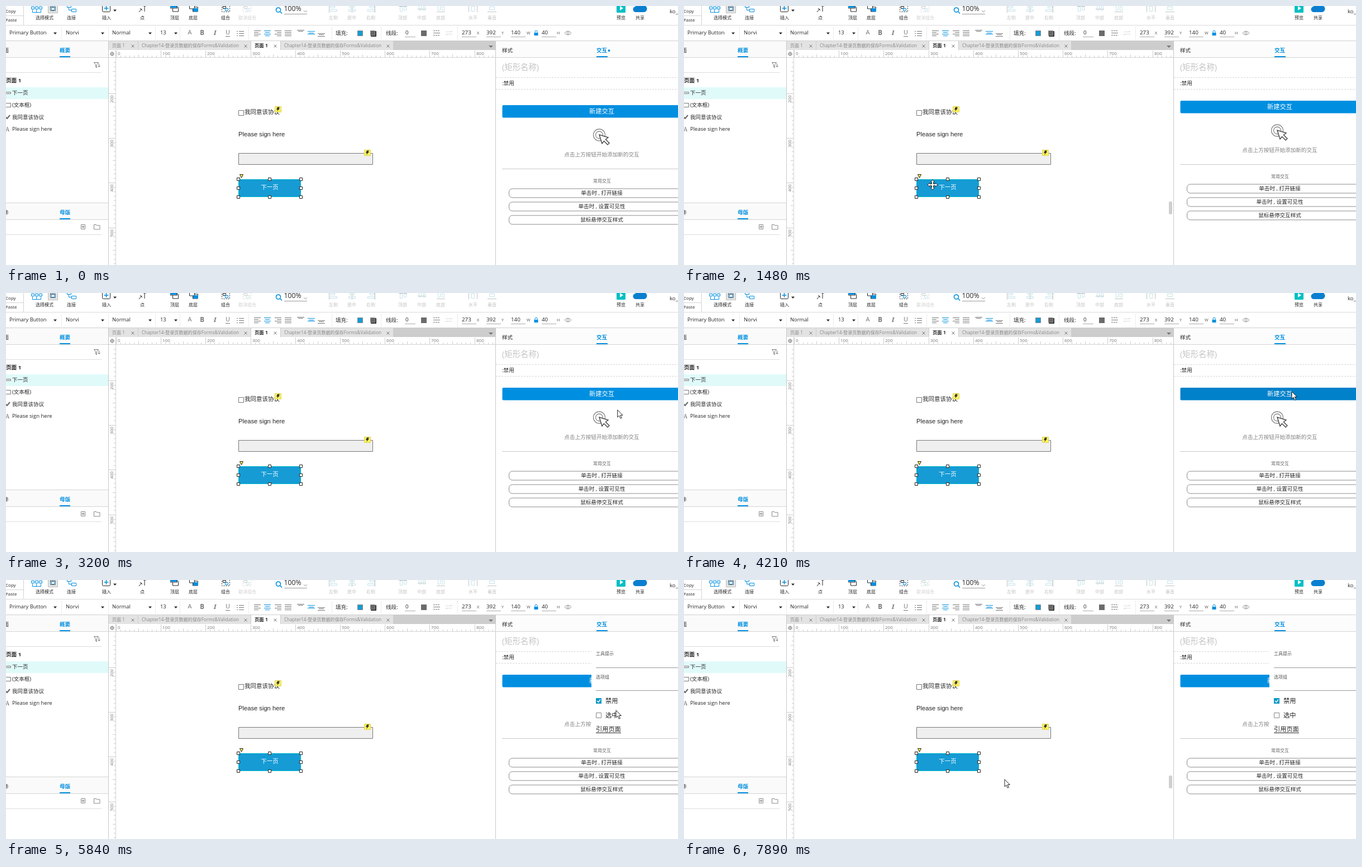
These frames come from a looping animation (1203x465 px, 8000 ms). An HTML page with a canvas:

```html
<!DOCTYPE html>
<html lang="zh">
<meta charset="utf-8">
<style>
html, body { margin: 0; width: 100%; height: 100%; overflow: hidden; background: #fff }
canvas { display: block }
</style>
<canvas id="stage" width="1203" height="465"></canvas>
<script>
const g = document.getElementById('stage').getContext('2d');
const LOOP = 8000, BLUE = '#008fe0', BTN = '#169bd5', INK = '#262626', PALE = '#cfcfcf';
const UI = '"Open Sans","Noto Sans CJK SC",sans-serif';
const ARIAL = '"Liberation Sans","Noto Sans CJK SC",sans-serif';

// Cursor stops: time, x, y
const stops = [
  [440, 1203, 428], [930, 518, 367], [1250, 518, 367], [1480, 445, 321], [1630, 445, 321],
  [2060, 1000, 122], [2420, 1097, 372], [2480, 1097, 372], [2560, 1129, 427], [2700, 1129, 427],
  [3340, 1090, 180], [4150, 1090, 180], [4210, 1088, 177], [4590, 1187, 140], [5280, 1187, 140],
  [5690, 1098, 236], [5790, 1098, 236], [5840, 1092, 234], [6010, 1074, 224], [6290, 1074, 224],
  [6710, 1061, 212], [6840, 1061, 212], [6940, 1068, 203], [7150, 1068, 203], [7270, 1074, 189],
  [7890, 574, 358], [8000, 574, 358]
];

function cursorAt(t) {
  const i = stops.findIndex(s => s[0] > t);
  if (i < 1) return null;
  const [t0, x0, y0] = stops[i - 1], [t1, x1, y1] = stops[i];
  const u = (t - t0) / (t1 - t0), e = u * u * (3 - 2 * u);
  return { x: x0 + (x1 - x0) * e, y: y0 + (y1 - y0) * e };
}

function text(s, x, y, size = 9.6, color = INK, align = 'left', style = '', family = UI) {
  g.font = `${style} ${size}px ${family}`;
  g.fillStyle = color;
  g.textAlign = align;
  g.textBaseline = 'middle';
  g.fillText(s, x, y + .7);
}
function rect(x, y, w, h, color) { g.fillStyle = color; g.fillRect(x, y, w, h); }
function frame(x, y, w, h, color, fill, r = 0) {
  g.beginPath();
  g.roundRect(x + .5, y + .5, w, h, r);
  if (fill) { g.fillStyle = fill; g.fill(); }
  g.lineWidth = 1; g.strokeStyle = color; g.stroke();
}
function round(x, y, w, h, r, color) {
  g.beginPath(); g.roundRect(x, y, w, h, r);
  g.fillStyle = color; g.fill();
}
const hline = (x0, x1, y, color = '#d4d4d4') => rect(x0, y, x1 - x0, 1, color);
const vline = (x, y0, y1, color = '#d4d4d4') => rect(x, y0, 1, y1 - y0, color);
function path(d, x, y, stroke, fill, width = 1) {
  const p = new Path2D(d);
  g.save();
  g.translate(x, y);
  if (fill) { g.fillStyle = fill; g.fill(p); }
  if (stroke) { g.strokeStyle = stroke; g.lineWidth = width; g.stroke(p); }
  g.restore();
}
const drop = (x, y, color = INK) => path('M-3-1.5H3L0 2Z', x, y, null, color);
const ARROW = 'M0 0V13L3 10.3 5.3 15.3 7.5 14.3 5.2 9.5H9.3Z';

function toolbar(sel) {
  const on = sel ? INK : PALE, accent = sel ? BLUE : '#b9def0', grey = '#c3c3c3', mint = '#c6e2ea';
  text('Copy', -1, 9, 8); text('Paste', -1, 25.5, 8);
  hline(0, 31, 17); vline(31, 0, 34);

  for (const x of [45, 52, 59]) frame(x, 1, 5, 4, BLUE);
  path('M2 0V5H17V0M9 0V5', 45.5, 6.5, BLUE);
  frame(75, -3, 17, 15, '#bbb', '#e6e6e6');
  g.setLineDash([2, 1]); frame(79, 1, 9, 7, INK); g.setLineDash([]);
  frame(81, 2, 5, 5, BLUE, '#fff');
  path('M0-2H7V3H0ZM8 6H16V11H8ZM3 3V8H8', 109.5, -.5, BLUE);
  frame(172, -5, 14, 15, INK, '#fff', 2);
  path('M0 4H8M4 0V8', 175.5, 0, BLUE, null, 1.5);
  drop(195, 8);
  path('M0 11L5 5M2 4L6 8M10 0V10M8 0H13', 238, 0, on);
  path('M0-2H12V4H0ZM4 4V10H14V2', 294.5, 0, on); rect(294, -1, 12, 4, accent);
  path('M0-2H9V5H0ZM6 5V10H15V2H9', 328.5, 0, on); rect(335, 4, 9, 6, accent);
  for (const [x, c] of [[386, on], [424, PALE]]) {
    g.setLineDash([2, 2]); frame(x, -3, 14, 13, c); g.setLineDash([]);
    frame(x + 2, 0, 5, 4, c); frame(x + 6, 4, 5, 4, c === on ? accent : mint);
  }
  [578, 612, 646].forEach((x, i) => {
    vline(x + i * 7, -2, 12, grey);
    frame(x + [2, 3, 5][i], 0, 8, 3, mint); frame(x + [2, 1, 1][i], 6, 12, 3, mint);
  });
  [703, 737, 771].forEach((x, i) => {
    hline(x, x + 15, i * 5, grey);
    frame(x + 2, i ? -1 : 1, 4, 8, mint); frame(x + 9, 1, 4, 6, mint);
  });
  vline(828, -1, 11, grey); vline(843, -1, 11, grey); frame(833, 0, 5, 9, mint);
  hline(862, 878, 10, grey); frame(865, 1, 9, 5, mint);

  [['选择模式', 69, INK], ['连接', 117, INK], ['插入', 180, INK], ['点', 244, on], ['顶层', 302, on],
   ['底层', 335, on], ['组合', 393, on], ['取消组合', 432, PALE], ['左侧', 586, grey], ['居中', 619, grey],
   ['右侧', 653, grey], ['顶部', 710, grey], ['中部', 744, grey], ['底部', 778, grey], ['水平', 836, grey],
   ['垂直', 870, grey], ['预览', 1101, INK], ['共享', 1135, INK]
  ].forEach(([s, x, c]) => text(s, x, 21.7, 8, c, 'center'));

  path('M8 4A4 4 0 1 0 0 4A4 4 0 1 0 8 4M7 7L10.5 10.5', 483.5, 3, BLUE, null, 1.6);
  text('100%', 497.5, 5.5, 12.2); hline(498, 539, 14, '#999');
  path('M0 0L3 3 6 0', 533, 8, '#999');
  round(1093, -4, 16, 16, 1, '#00bfc4');
  path('M0 0L6 4 0 8Z', 1099, 0, null, '#fff');
  path('M5 11A5 5 0 0 1 4 1A8 8 0 0 1 18-1A6 6 0 0 1 19 11Z', 1123, 0, null, '#0a7fd0');
  text('ko_', 1188, 9.5, 9.6);
  hline(0, 1203, 34, '#dadada');
}

function formatBar(sel) {
  const on = sel ? INK : '#c4c4c4', icon = sel ? '#777' : '#c9c9c9', accent = sel ? BLUE : icon, y = 48;
  [[sel ? 'Primary Button' : 'Default', 6, 88], ['Norvi', 107, 173], ['Normal', 190, 258], ['13', 276, 304]]
    .forEach(([s, x, a]) => { text(s, x, y, 9.4, on); drop(a, 49, on); });
  [99, 183, 267, 311, 434, 583, 671, 808].forEach(x => vline(x, 37, 61, '#ebebeb'));
  text('A', 329, 47, 11, icon, 'center');
  text('B', 351, y, 11.5, icon, 'center', 'bold');
  text('I', 374, y, 11.5, icon, 'center', 'italic 600', '"Noto Serif",serif');
  text('U', 397, 47.5, 11, icon, 'center'); hline(393, 401, 54, icon);
  for (const d of [0, 4, 8]) { rect(413, 45 + d, 2, 1, icon); hline(417, 426, 45 + d, icon); }
  [444, 462, 481, 499].forEach((x, i) => {
    for (let k = 0; k < 4; k++) {
      const cut = k % 2 && i < 3 ? 4 : 0;
      hline(x + cut * i / 2, x + 12 - cut * (1 - i / 2), 44 + k * 3, i === 1 ? accent : icon);
    }
  });
  [521, 540, 558].forEach((x, i) => {
    const top = [43, 45, 49][i], c = i === 1 ? accent : icon;
    hline(x, x + 13, top, c); hline(x + 2, x + 11, top + 2 + (i === 1), c); if (i) hline(x, x + 13, top + 5, c);
  });

  text('填充:', 590, 48.5); text('线段:', 680, 48.5);
  frame(629, 44, 9, 9, sel ? '#888' : '#ccc', sel ? BTN : '#fff');
  frame(653, 45, 9, 9, sel ? INK : '#ccc', sel ? '#444' : '#fff');
  frame(652, 44, 8, 8, sel ? '#888' : '#ccc', sel ? '#666' : '#e4e4e4');
  text(sel ? '0' : '1', 715, y, 9.8, on); hline(714, 733, 55, '#aaa');
  rect(743, 44, 10, 10, sel ? '#6b6b6b' : '#c4c4c4');
  g.setLineDash([3, 1]); path('M0 0H12M0 8H12', 765, 44.5, icon); g.setLineDash([]);
  hline(765, 777, 48, icon);
  path('M0 2H12L9 0M12 6H0L3 8', 787, 44.5, '#ddd');
  [['273', 816, 'X', 843], ['392', 860, 'Y', 887], ['140', 904, 'W', 932], ['40', 959, 'H', 986]]
    .forEach(([s, x, name, nx]) => {
      if (sel) text(s, x, y, 9.8);
      text(name, nx, 48.5, 7.2, '#555'); hline(x, x + 26, 55, '#aaa');
    });
  path('M-2 0V-2A2 2 0 0 1 2-2V0', 949, 48, BLUE); rect(945.5, 48, 7, 5, BLUE);
  path('M0 0Q6-7 12 0Q6 7 0 0ZM8 0A2 2 0 1 0 4 0A2 2 0 1 0 8 0', 1000, 48.5, sel ? '#999' : '#d4d4d4');
  hline(0, 1203, 62, '#d0d0d0');
}

function header(label, other, y) {
  rect(0, y, 183, 30, '#fafafa');
  hline(0, 183, y + 29);
  text(other, 5, y + 17, 9.6, INK, 'right');
  text(label, 105.5, y + 17, 9.6, BLUE, 'center', 'bold');
  rect(96, y + 27, 19, 2, BLUE);
}

function outline(sel) {
  header('概要', '面', 63);
  path('M0 0H8L5 4V9L3 8V4ZM9 2V8M7.5 6L9 8 11 6', 157.5, 101.5, '#777');
  hline(0, 171, 119, '#ddd');
  text('页面 1', 0, 134, 9.6, INK, 'left', 'bold');
  if (sel) rect(0, 146, 183, 21, '#e0fafa');
  frame(-3, 154, 11, 3, '#888', '#ddd');
  frame(-3, 174, 11, 7, '#777');
  path('M0 3L3 6 8 0', -1, 196, '#666', null, 2);
  text('A', -1, 221, 10, '#777', 'left', '', '"Noto Serif",serif');
  ['下一页', '(文本框)', '我同意该协议', 'Please sign here'].forEach((s, i) => text(s, 11, 156 + i * 21.7, 9.5));
  hline(0, 183, 353);
  header('母版', '件', 354);
  frame(134, 392, 7, 8, '#888'); path('M0 2.5H5M2.5 0V5', 135.5, 394, '#777');
  path('M0 0H4L5 1.5H10.5V8.5H0Z', 157.5, 392.5, '#888');
  hline(0, 171, 410, '#ddd');
}

function canvasFrame() {
  rect(184, 63, 692, 16, '#cdcdcd');
  const doc = 'Chapter14-登录页数据的保存Forms&Validation';
  [['页面 1', 184, 52], [doc, 237, 201], ['页面 1', 439, 52], [doc, 492, 201]].forEach(([s, x, w], i) => {
    const active = i === 2;
    rect(x, 63, w, 16, active ? '#fff' : '#e3e3e3');
    text(s, x + 6, 71, active ? 8.4 : 8.1, active ? INK : '#888', 'left', active ? 'bold' : '');
    path('M0 0L5 5M5 0L0 5', x + w - 11.5, 69.5, '#777');
  });
  path('M-4-2H4L0 2Z', 868, 73, null, '#777');
  hline(184, 876, 92); vline(196, 79, 465);
  path('M0 4H8M4 0V8M7 4A3 3 0 1 0 1 4A3 3 0 1 0 7 4', 186, 82, '#888');
  for (let k = 0; k < 85; k++) {
    const x = Math.round(197 + k * 8.02), y = Math.round(-3.4 + k * 8.02), major = k % 10 === 0;
    const len = major ? 12 : k % 5 ? 3 : 5;
    vline(x, 92 - len, 92, '#ccc');
    if (y > 93 && y < 465) hline(196 - len, 196, y, '#ccc');
    if (!major) continue;
    text(k * 10, x + 3, 85.5, 8, '#777');
    if (k >= 20 && k <= 50) {
      g.save(); g.translate(189.5, y + 10); g.rotate(-Math.PI / 2);
      text(k * 10, 0, 0, 8, '#777', 'center'); g.restore();
    }
  }
  vline(183, 63, 465, '#c8c8c8'); vline(876, 63, 465, '#c8c8c8');
}

function note(x, y) {
  frame(x, y, 11, 10, '#ddd45a', '#fff35c');
  path('M2 0H6L4.5 2.5H6L1 8 2.3 4.5H0Z', x + 3, y + 1.5, null, '#333');
}

function widgets(sel) {
  frame(416, 187, 9, 9, '#777', '#fff');
  text('我同意该协议', 427, 190.5, 10.5, INK, 'left', '', ARIAL);
  note(481, 180);
  text('Please sign here', 416, 230.3, 11.2, INK, 'left', '', ARIAL);
  frame(416, 264, 240, 20, '#777', '#efefef');
  note(641, 258);
  round(416, 311, 112, 32, 4, BTN);
  text('下一页', 472, 325.8, 10.5, '#fff', 'center', '', ARIAL);
  if (!sel) return;
  frame(416, 311, 111, 31, '#00b8c8');
  for (const x of [416, 472, 528]) for (const y of [311, 327, 343])
    if (x !== 472 || y !== 327) frame(x - 3, y - 3, 5, 5, '#222', '#fff');
  path('M0 0H6L3 6Z', 418.5, 302.5, '#222', '#ffee40');
}

function inspector(t, sel) {
  rect(877, 63, 326, 29, '#fcfcfc');
  hline(877, 1203, 92);
  text('样式', 888, 79.7);
  text('交互', 1057, 79.7, 9.6, BLUE, 'left', 'bold');
  rect(1057, 90, 20, 2, BLUE);
  if (t < 930) { g.beginPath(); g.arc(1079.5, 80, 2, 0, 7); g.fillStyle = BLUE; g.fill(); }

  const top = !sel ? 117 : t < 930 ? 178 : 170;
  if (sel) {
    text('(矩形名称)', 888, 110.5, 14.4, '#c4c4c4');
    if (t > 4380 && t < 4590) rect(877, 129, 326, 20, '#f7f7f7');
    g.setLineDash([3, 2]);
    path('M0 0H326M0 21H326', 877, 128.5, '#d6d6d6');
    g.setLineDash([]);
    text(':禁用', 888, 138.5);
  }
  const hot = t > 3260 && t < 4330;
  round(888.5, top, 330, 22.6, 2, hot ? '#0081ca' : BLUE);
  text('新建交互', 1066.5, top + 11, 11.2, '#fff', 'center');
  for (const r of [10.5, 6.5]) {
    g.beginPath(); g.arc(1062, top + 53.5, r, 0, 7);
    g.lineWidth = 1.3; g.strokeStyle = '#8a8a8a'; g.stroke();
  }
  path('M0 0L5 16 8.5 11.5 15 18 18 15 11.5 8.5 16 5Z', 1062, top + 53, '#444', '#fff', 1.4);
  text('点击上方按钮开始添加新的交互', 1066.5, top + 88.5, 9.6, '#808080', 'center');
  hline(888, 1203, top + 114, '#c8c8c8');
  if (sel) {
    text('常用交互', 1067, top + 136.2, 8, '#666', 'center');
    ['单击时 , 打开链接', '单击时 , 设置可见性', '鼠标悬停交互样式'].forEach((s, i) => {
      const y = top + 150 + i * 24, hover = i === 2 && t > 2370 && t < 2730;
      frame(900, y - .5, 330, 16, '#8c8c8c', hover ? '#ececec' : '#fff', 6);
      text(s, 1066.5, y + 7.5, 9.6, INK, 'center');
    });
  }
  if (t >= 5050) popup();
}

function popup() {
  rect(1048, 122, 155, 154, '#fff');
  text('工具提示', 1056, 132, 8, '#555'); hline(1056, 1203, 157, '#999');
  text('选项组', 1056, 174, 8, '#555'); hline(1056, 1203, 198, '#999');
  rect(1056, 212, 10, 10, '#0a98c4');
  path('M0 2.5L2.5 5 6 0', 1058, 214.5, '#fff', null, 1.4);
  frame(1056, 238, 9, 9, '#888', '#fff');
  text('禁用', 1073, 217.7, 11.3); text('选中', 1073, 243.5, 11.3);
  text('引用页面', 1056, 268.5, 11.2); hline(1056, 1101, 274, INK);
}

function pointer(c) {
  if (c.x < 876) round(868, 351, 6, 23, 2, '#cfcfcf');
  const overButton = c.x > 416 && c.x < 528 && c.y > 311 && c.y < 343;
  if (overButton) {
    path('M0-9L3.5-5H1.5V-1.5H5V-3.5L9 0 5 3.5V1.5H1.5V5H3.5L0 9-3.5 5H-1.5V1.5H-5V3.5L-9 0-5-3.5V-1.5H-1.5V-5H-3.5Z',
      c.x, c.y, '#222', '#fff');
  } else path(ARROW, c.x, c.y, '#222', '#fff');
}

function draw(now) {
  const t = now % LOOP, sel = t < 930 || t >= 1470;
  rect(0, 0, 1203, 465, '#fff');
  toolbar(sel);
  formatBar(sel);
  outline(sel);
  canvasFrame();
  widgets(sel);
  inspector(t, sel);
  const c = cursorAt(t);
  if (c) pointer(c);
  requestAnimationFrame(draw);
}
requestAnimationFrame(draw);
</script>
</html>
```
